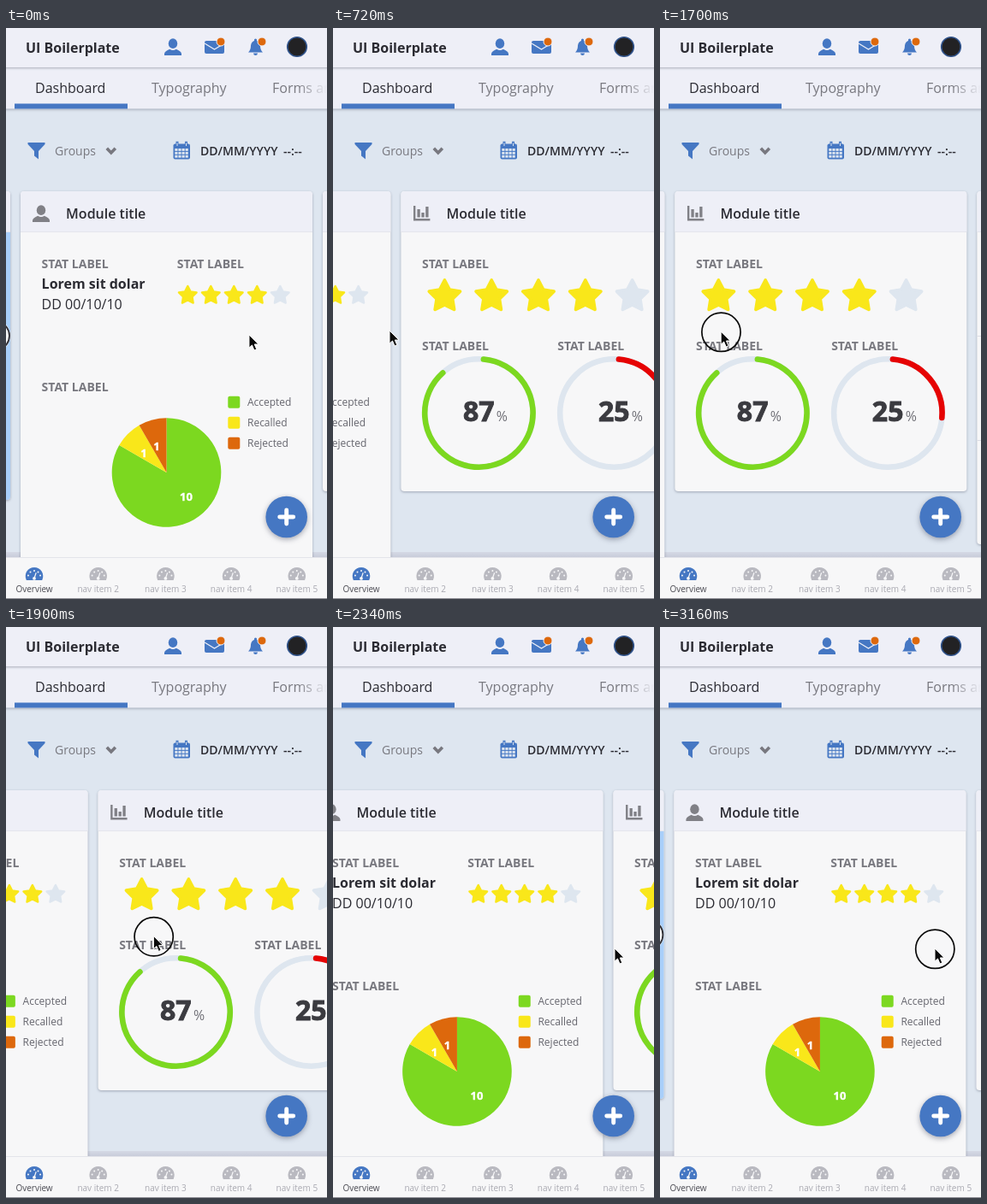
Write an HTML page that moves like this. It is 375x668 px and loops after 3180 ms.

```html
<!DOCTYPE html>
<html lang="en">
<head>
<meta charset="utf-8">
<title>Dashboard carousel</title>
<style>
html, body { margin: 0; width: 100%; height: 100%; overflow: hidden; background: #dee6f0; }
svg { display: block; font-family: "Open Sans", "Noto Sans", sans-serif; }
.lift { filter: drop-shadow(0 1px 1.5px rgba(40, 45, 70, .35)); }
.fab { filter: drop-shadow(0 2px 3px rgba(40, 45, 70, .4)); }
</style>
</head>
<body>
<svg id="stage" width="375" height="668" viewBox="0 0 375 668"></svg>
<script>
const BLUE = '#4577c3', INK = '#2b2b32', GREY = '#78787f', BAR = '#eeeff7', PANEL = '#f7f7f8',
  TRACK = '#dee6ef', GREEN = '#7cd820', YELLOW = '#f9e71a', ORANGE = '#dd680c', RED = '#e60303';
const LOOP = 3180, PITCH = 353;

// Drawing helpers
const text = (x, y, s, size, weight = 400, fill = INK, more = '') =>
  `<text x="${x}" y="${y}" font-size="${size}" font-weight="${weight}" fill="${fill}" ${more}>${s}</text>`;
const heavy = (x, y, s, size, fill, more = '') =>
  text(x, y, s, size, 700, fill, `stroke="${fill}" stroke-width="${size * .03}" ${more}`);
const rect = (x, y, w, h, fill, more = '') =>
  `<rect x="${x}" y="${y}" width="${w}" height="${h}" fill="${fill}" ${more}/>`;
const dot = (x, y, r, fill, more = '') => `<circle cx="${x}" cy="${y}" r="${r}" fill="${fill}" ${more}/>`;
const path = (d, fill, more = '') => `<path d="${d}" fill="${fill}" ${more}/>`;
const line = (d, color, width, more = '') => path(d, 'none', `stroke="${color}" stroke-width="${width}" ${more}`);
const at = (x, y, s) => `<g transform="translate(${x} ${y})">${s}</g>`;
const polar = (x, y, r, deg) => {
  const a = deg * Math.PI / 180;
  return `${(x + r * Math.sin(a)).toFixed(2)} ${(y - r * Math.cos(a)).toFixed(2)}`;
};
const arc = (x, y, r, from, to) =>
  `${polar(x, y, r, from)}A${r} ${r} 0 ${to - from > 180 ? 1 : 0} 1 ${polar(x, y, r, to)}`;

function star(x, y, r, fill) {
  const points = Array.from({ length: 10 }, (_, i) => polar(x, y, i % 2 ? r * .51 : r, i * 36));
  return path(`M${points.join('L')}Z`, fill, `stroke="${fill}" stroke-width="${r * .2}" stroke-linejoin="round"`);
}
const stars = (x, y, step, r) =>
  [0, 1, 2, 3, 4].map(i => star(x + i * step, y, r, i < 4 ? YELLOW : TRACK)).join('');

const label = (x, y) => text(x, y, 'STAT LABEL', 14, 700, GREY);

const person = (x, y, fill) => at(x, y,
  `<ellipse cy="-3.8" rx="5.2" ry="5.9" fill="${fill}"/>` +
  path('M-10 10V8Q-9.5 5 -3.8 2.8Q0 5.2 3.8 2.8Q9.5 5 10 8V10Z', fill));

const gauge = (x, fill) => at(x, 642.3,
  path('M-9.2 3.6A10.3 10.3 0 1 1 9.2 3.6Z', fill) +
  [-75, -38, 0, 38, 75].map(a => dot(...polar(0, 0, 7.3, a).split(' '), 1, PANEL)).join('') +
  line('M0 1.5L2.2 -5', PANEL, 1.2) + dot(0, 1.6, 1.9, PANEL));

function ring(x, percent, color) {
  const y = 450.5, r = 63.2;
  return dot(x, y, r, 'none', `stroke="${TRACK}" stroke-width="6.6"`) +
    line('M' + arc(x, y, r, 5, 5 + percent * 3.6), color, 6.6, 'stroke-linecap="round"') +
    heavy(x - 18.5, 460, percent, 32, '#3b3b40') +
    text(x + 20.4, 460, '%', 16, 400, '#6f6f76');
}

function slice(from, to, fill) {
  return path(`M187.5 520L${arc(187.5, 520, 63.8, from, to)}Z`, fill);
}

const card = (i, bottom, body) => at(i * PITCH, 0,
  rect(17, 191, 341, bottom - 191, PANEL, 'rx="4" class="lift"') +
  path('M17 238V195Q17 191 21 191H354Q358 191 358 195V238Z', BAR) +
  rect(17, 238, 341, 1, '#e4e5ec') + body);

const title = text(70.1, 222.5, 'Module title', 16, 600);

const mapCard = card(-1, 552,
  path('M17 239H358V548Q358 552 354 552H21Q17 552 17 548Z', '#a8cffa') +
  dot(338, 360, 20, '#f4f4f4') + line('M340 343A17 17 0 0 1 340 377', INK, 1.8));

const pieCard = card(0, 700,
  person(41, 217, '#808086') + title +
  label(41.6, 280.5) + label(199.8, 280.5) + label(41.6, 425) +
  text(41.6, 305.4, 'Lorem sit dolar', 16, 700) + text(41.6, 329.4, 'DD 00/10/10', 16) +
  stars(212.3, 312.8, 27, 11) +
  slice(0, 300, GREEN) + slice(300, 330, YELLOW) + slice(330, 360, ORANGE) +
  [[161, 502, 1], [176, 494, 1], [210.5, 552.5, 10]].map(([x, y, n]) =>
    heavy(x, y, n, 13, '#fff', 'text-anchor="middle"')).join('') +
  [['Accepted', GREEN], ['Recalled', YELLOW], ['Rejected', ORANGE]].map(([s, color], i) =>
    rect(259.3, 430.7 + i * 24, 14, 14, color, 'rx="2"') +
    text(282, 442.3 + i * 24, s, 12, 400, '#66666e')).join(''));

const ringCard = card(1, 542,
  line('M32.8 208V224.3H51', '#808086', 2.4) +
  line('M37.7 221.5V212M42.6 221.5V216M47.5 221.5V209', '#808086', 3.3) + title +
  label(41.6, 280.5) + label(41.6, 376.7) + label(199.8, 376.7) +
  stars(68, 314, 54.8, 19) + ring(108, 87, GREEN) + ring(266, 25, RED));

const listCard = card(2, 604, rect(17, 360, 341, 1, '#dcdde4') + rect(17, 482, 341, 1, '#dcdde4'));

const toolbar =
  line('M117.8 140.7L122.8 146L127.8 140.7', GREY, 3.6) +
  path('M25.5 134H45.5V136L38 144V153.5L33 149.5V144L25.5 136Z', BLUE) +
  text(57, 148.5, 'Groups', 14, 400, GREY) +
  rect(195.5, 135.5, 19.5, 18, BLUE, 'rx="2"') +
  line('M200 132.8V138.5M210.5 132.8V138.5', BLUE, 3) +
  line('M200 134.5V138M210.5 134.5V138', '#dee6f0', 1) +
  [0, 1, 2].map(r => [0, 1, 2, 3].map(c =>
    rect(197.3 + c * 4.1, 141 + r * 3.9, 3.2, 2.9, '#dee6f0')).join('')).join('') +
  text(227, 148.5, 'DD/MM/YYYY', 14, 600) + text(324, 148.5, '--:--', 14, 600);

const header =
  rect(-5, 40, 385, 54.5, BAR, 'class="lift"') +
  text(34, 76, 'Dashboard', 16) + text(170, 76, 'Typography', 16, 400, GREY) +
  text(311, 76, 'Forms and', 16, 400, GREY) +
  rect(340, 50, 35, 42, 'url(#fade)') +
  rect(10, 88.5, 132, 6, BLUE) +
  rect(-5, -5, 385, 51, BAR, 'class="lift"') +
  text(23, 29, 'UI Boilerplate', 16, 700) +
  person(195, 22, BLUE) +
  rect(232, 15, 23, 15, BLUE, 'rx="2"') + line('M232 18L243.5 25L255 18', BAR, 1.3) +
  path('M283 28.5Q286 26 286 20.5Q286.5 15.5 291.5 14.5Q297 15.5 297 20.5Q297 26 300 28.5Z', BLUE) +
  dot(291.5, 14, 1.6, BLUE) + path('M289 29.5H294Q293.7 32 291.5 32Q289.3 32 289 29.5Z', BLUE) +
  [251, 299].map(x => dot(x, 16, 5, ORANGE, `stroke="${BAR}" stroke-width="1"`)).join('') +
  dot(340, 22, 11.3, '#222224', 'stroke="#31548c" stroke-width="1.6"');

const footer =
  rect(-5, 619.5, 385, 60, PANEL) + rect(0, 619, 375, 1, '#e3e4ea') +
  ['Overview', 'nav item 2', 'nav item 3', 'nav item 4', 'nav item 5'].map((s, i) => {
    const x = 33 + i * 76.7 - (i === 1 ? 2 : 0);
    return gauge(x, i ? '#b9b9c0' : BLUE) +
      text(x, 659.6, s, 10, 400, i ? '#a9a9b1' : '#4a4a52', 'text-anchor="middle"');
  }).join('') + rect(0, 667, 375, 1, '#8c8c92');

const fab = dot(327.7, 572, 24.3, BLUE, 'class="fab"') +
  line('M319.7 572H335.7M327.7 564V580', '#fff', 4.9, 'stroke-linecap="round"');

const pointer = dot(.3, .8, 22.6, 'none', 'id="press" stroke="#0a0a0a" stroke-width="1.7"') +
  path('M0 0V15.2L3.5 12L6 18L8.8 16.8L6.3 11H11Z', '#0a0a0a', 'stroke="#fff" stroke-width="1"');

const $ = id => document.getElementById(id);
$('stage').innerHTML =
  `<defs><linearGradient id="fade"><stop stop-color="${BAR}" stop-opacity="0"/>
  <stop offset="1" stop-color="${BAR}"/></linearGradient>
  <linearGradient id="dusk" x2="0" y2="1"><stop stop-color="#d5d9e5"/>
  <stop offset="1" stop-color="#c6cad8"/></linearGradient></defs>` +
  rect(0, 0, 375, 668, '#dee6f0') + rect(0, 613, 375, 7, 'url(#dusk)') + toolbar +
  `<g id="track">${mapCard}${pieCard}${ringCard}${listCard}</g>` +
  header + footer + fab + `<g id="pointer">${pointer}</g>`;

// Pointer keys: time, x, y, power of the ease towards this key (negative = ease out)
const KEYS = [
  [0, 284, 359, 1], [120, 278, 358, 1], [480, 104, 355, 1.4], [640, 66, 354, -2.5], [960, 66, 354, 1],
  [1700, 71, 355, 1], [2060, 275, 368, 1.2], [2340, 329, 376, -3], [3000, 321, 376, -2], [LOOP, 321, 376, 1]
];
const PRESSES = [[120, 500], [1640, 2050], [3080, LOOP]];

const ease = (p, k) => k > 0 ? p ** k : 1 - (1 - p) ** -k;

function pointerAt(t) {
  const i = KEYS.findIndex(key => key[0] > t);
  const [t0, x0, y0] = KEYS[i - 1], [t1, x1, y1, k] = KEYS[i];
  const p = ease((t - t0) / (t1 - t0), k);
  return [x0 + (x1 - x0) * p, y0 + (y1 - y0) * p];
}

// Remaining distance of a damped spring after letting go
function settle(ms, a, b) {
  const n = ms * .06;
  return a * .916 ** n + b * .786 ** n;
}

function scrollAt(t) {
  if (t < 140) return 0;
  if (t < 480) return -160.5 * ((t - 140) / 340) ** 1.5;
  if (t < 1720) return -PITCH + settle(t - 480, 225.5, -33);
  if (t < 2060) return -PITCH + 193 * ((t - 1720) / 340) ** 1.2;
  return -settle(t - 2060, 189, -29);
}

function draw(now) {
  const t = now % LOOP;
  $('track').setAttribute('transform', `translate(${scrollAt(t).toFixed(2)} 0)`);
  $('pointer').setAttribute('transform', `translate(${pointerAt(t).map(v => v.toFixed(2)).join(' ')})`);
  $('press').style.display = PRESSES.some(([a, b]) => t >= a && t < b) ? '' : 'none';
}

const start = performance.now();
function tick() {
  draw(performance.now() - start);
  requestAnimationFrame(tick);
}
tick();
</script>
</body>
</html>
```
